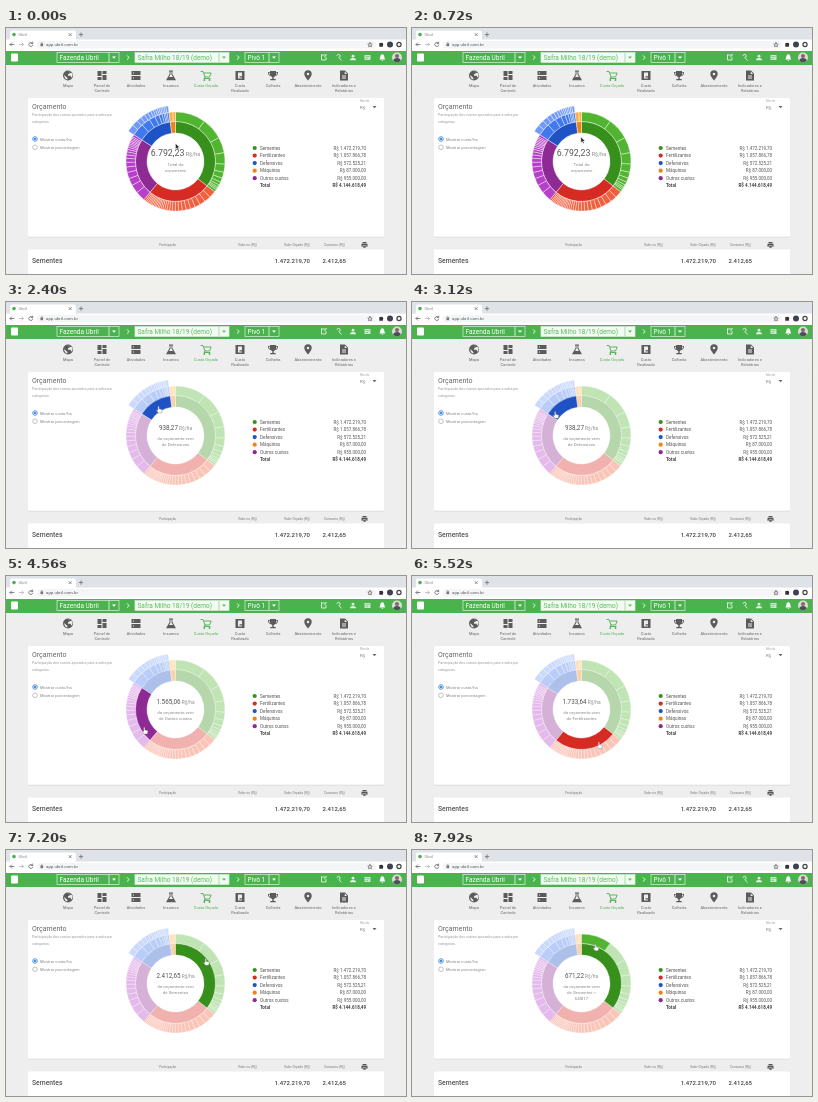
An HTML page that plays this animation: 400 by 246 pixels, repeating every 8000 ms.

```html
<!DOCTYPE html>
<html lang="pt-BR">
<head>
<meta charset="utf-8">
<title>Orçamento</title>
<style>
  html, body { margin: 0; width: 100%; height: 100%; overflow: hidden; background: #eee; }
  svg { display: block; width: 100vw; height: 100vh; }
  text { font-family: Roboto, Arial, sans-serif; white-space: pre; }
  .line { fill: none; stroke-width: .9; stroke-linecap: round; stroke-linejoin: round; }
</style>
</head>
<body>
<svg id="stage" viewBox="0 0 400 246"></svg>
<script>
const stage = document.getElementById('stage');
const CX = 169.5, CY = 133.5, LOOP = 8000, STEP = 240;
const FADED = 0.36;

function add(tag, attrs, parent = stage) {
  const node = document.createElementNS('http://www.w3.org/2000/svg', tag);
  for (const key in attrs) node.setAttribute(key, attrs[key]);
  parent.appendChild(node);
  return node;
}
const rect = (x, y, width, height, fill, extra) => add('rect', { x, y, width, height, fill, ...extra });
const dot = (cx, cy, r, fill, extra) => add('circle', { cx, cy, r, fill, ...extra });
const line = (d, stroke, extra) => add('path', { d, stroke, class: 'line', ...extra });
const shape = (d, fill, extra) => add('path', { d, fill, 'fill-rule': 'evenodd', ...extra });
function text(x, y, content, size, fill = '#555', extra) {
  const node = add('text', { x, y, 'font-size': size, fill, ...extra });
  node.textContent = content;
  return node;
}
const middle = { 'text-anchor': 'middle' }, end = { 'text-anchor': 'end' };
const caret = (x, y, fill) => shape(`M${x - 2} ${y - 1}h4l-2 2.3z`, fill);

function drawBrowser() {
  rect(0, 0, 400, 12, '#dfe2e7');
  rect(4, 2.5, 66, 10, '#fff', { rx: 2 });
  dot(8, 6.6, 1.8, '#4caf50');
  text(12.5, 8.2, 'Ubril', 4.2, '#888');
  line('M63.2 5.6l2 2m0-2l-2 2M73.3 6.6h3.4m-1.7-1.7v3.4', '#777', { 'stroke-width': .6 });
  rect(0, 11.5, 400, 12, '#fff');
  line('M8 16.5h-4m1.6-1.6l-1.6 1.6l1.6 1.6', '#777', { 'stroke-width': .6 });
  line('M13.5 16.5h4m-1.6-1.6l1.6 1.6l-1.6 1.6', '#bbb', { 'stroke-width': .6 });
  line('M26.5 15.4a2 2 0 1 0 .2 1.8M26.7 14v1.6h-1.6', '#777', { 'stroke-width': .6 });
  rect(31, 13, 339, 7.4, '#f4f5f6', { rx: 3.7 });
  rect(34.5, 16, 2.6, 2.2, '#777');
  line('M35 16v-.7q.8-1 1.6 0v.7', '#777', { 'stroke-width': .4 });
  text(40, 18.2, 'app.ubril.com.br', 4.4, '#555');
  line('M364 14.6l.7 1.4 1.5.2-1.1 1 .3 1.5-1.4-.7-1.4.7.3-1.5-1.1-1 1.5-.2z', '#777', { 'stroke-width': .4 });
  shape('M373.3 15h1.2q.6-1.2 1.2 0h1.2v1.2q1.2.5 0 1.2v1.3h-3.6z', '#333');
  dot(384, 16.5, 3, '#3d4450');
  dot(393, 16.5, 2.1, '#fff', { stroke: '#444', 'stroke-width': 1.2 });
}

function selectBox(x, width, label, fill, ink, edge) {
  rect(x, 24.6, width, 9.8, fill, { stroke: '#d9f0d9', 'stroke-width': .7 });
  line(`M${x + width - 10} 25v9`, edge, { 'stroke-width': .6 });
  text(x + 2.5, 31.9, label, 6.5, ink);
  caret(x + width - 5, 29.5, ink);
}

function drawAppBar() {
  rect(0, 23, 400, 14, '#4bb34d');
  rect(5, 25.5, 7, 8, '#fff', { rx: 1 });
  selectBox(51, 62, 'Fazenda Ubril', '#4bb34d', '#fff', '#d9f0d9');
  selectBox(129, 94, 'Safra Milho 18/19 (demo)', '#f3faf3', '#5abb5c', '#a5d9a6');
  selectBox(239, 34, 'Pivô 1', '#4bb34d', '#fff', '#d9f0d9');
  line('M121.3 27.7l1.8 1.8-1.8 1.8M231.3 27.7l1.8 1.8-1.8 1.8', '#fff');
  line('M315.5 27h4m-4 0v5h4.5v-2.5M318.5 29l2-2.5', '#e3f4e3', { 'stroke-width': .7 });
  line('M331 27.5a1.6 1.6 0 1 1 1.8 2l2.5 2.7', '#e3f4e3', { 'stroke-width': .8 });
  dot(347, 28.2, 1.4, '#e3f4e3');
  shape('M344 32.3q0-2.4 3-2.4t3 2.4z', '#e3f4e3');
  shape('M358.5 27h6v5h-6zM359.5 28.5v.6h4v-.6zM359.5 30v.6h2.5v-.6z', '#c8e9c9');
  shape('M373.3 31.5q1-1 1-3 .3-2.3 2-2.3t2 2.3q0 2 1 3zM375.4 32h2l-1 1z', '#fff');
  dot(391, 29.5, 5, '#dcdad8');
  dot(391, 28, 2, '#7d6a62');
  shape('M387.3 32.8q.4-2.8 3.7-2.8t3.7 2.8q-3.7 3.3-7.4 0z', '#4a4f58');
}

function drawMenu() {
  rect(0, 37, 400, 30.5, '#eee');
  const items = [
    [62, 'Mapa', 'M-5 0a5 5 0 1 0 10 0a5 5 0 1 0-10 0zM-3.8-.5l3.2 3v1.5q-3-.5-3.2-4.500zM0-3.800h2v1.500l-2 1v1.500h2.500l1 2q2-3 0-5z'],
    [96, 'Painel de|Controle', 'M-4.500-4.500h4v5h-4zM.5-4.500h4v3h-4zM-4.500 1.500h4v3h-4zM.5-.5h4v5h-4z'],
    [130, 'Atividades', 'M-4.500-4.500h9v4h-9zM-4.500.5h9v4h-9zM-3-3v1h1v-1zM-3 2v1h1v-1z'],
    [165, 'Insumos', 'M-2-5h4v1h-.6v2.500l3.600 6.300h-10l3.600-6.300v-2.500h-.6zM-.5-4v3l-1.500 2.500h4l-1.500-2.500v-3z'],
    [234, 'Custo|Realizado', 'M-4.500-4.500h9v9h-9zM-2-3v6h4v-1h-2.500v-1.200h2.500v-3.800z'],
    [267, 'Colheita', 'M-3-4.500h6v1h2q0 4-3 4-.5 1-1.300 1.300v1.700h2v1.200h-5.400v-1.200h2v-1.700q-.8-.3-1.300-1.300-3 0-3-4h2zM-4-2.700q0 1.700 1 2.200v-2.200zM4-2.700h-1v2.200q1-.5 1-2.200z'],
    [302, 'Abastecimento', 'M0 5q-3.700-4.300-3.700-6.500a3.700 3.700 0 0 1 7.400 0q0 2.200-3.700 6.500zM-1.300-1.500a1.300 1.300 0 1 0 2.600 0a1.300 1.300 0 1 0-2.600 0z'],
    [338, 'Indicadores e|Relatórios', 'M-4-5h5l3 3v7h-8zM-2 0v.9h4v-.9zM-2 2v.9h4v-.9zM.7-4v2.500h2.500z']
  ];
  const label = (x, lines, color) =>
    lines.split('|').forEach((part, i) => text(x, 59.4 + i * 4.7, part, 4, color, middle));
  for (const [x, lines, d] of items) {
    shape(d, '#5b5b5b', { transform: `translate(${x} 47.500)` });
    label(x, lines, '#666');
  }
  line('M195 43.500h2l2 5.500h4.500l1.700-4h-7M199 49l-1 1.500h6', '#4caf50');
  dot(198.3, 52, .9, '#4caf50');
  dot(203.500, 52, .9, '#4caf50');
  label(200, 'Custo Orçado', '#4caf50');
}

const groups = [
  { name: 'Sementes', share: 35.5, perHa: '2.412,65', total: '1.472.219,70', colors: ['#37901b', '#52b532'], rate: .278 },
  { name: 'Fertilizantes', share: 25.5, perHa: '1.733,64', total: '1.057.866,78', colors: ['#d62b23', '#f0603e'], rate: .09 },
  { name: 'Outros custos', share: 23.1, perHa: '1.565,06', total: '955.000,00', colors: ['#8d2a93', '#b740c8'], rate: .14 },
  { name: 'Defensivos', share: 13.8, perHa: '938,27', total: '572.525,21', colors: ['#1f53c5', '#4078ed', '#7099fb'], rate: .3 },
  { name: 'Máquinas', share: 2.1, perHa: '114,72', total: '87.000,00', colors: ['#ee8417', '#ffad42'], rate: .6 }
];

function drawPage() {
  rect(22, 70.5, 356, 139, '#d9d9d9', { rx: 1 });
  rect(22, 70, 356, 138.8, '#fff', { rx: 1 });
  text(26, 81.2, 'Orçamento', 7, '#666');
  text(26, 87.5, 'Participação dos custos apurados para a safra por', 3.6, '#999');
  text(26, 94.6, 'categorias.', 3.6, '#999');
  dot(29, 111, 2.3, '#fff', { stroke: '#4a8de8', 'stroke-width': .9 });
  dot(29, 111, 1.3, '#4a8de8');
  text(34, 112.6, 'Mostrar custo/ha', 4.1, '#888');
  dot(29, 119.3, 2.3, '#fff', { stroke: '#aaa', 'stroke-width': .7 });
  text(34, 120.9, 'Mostrar porcentagem', 4.1, '#888');
  text(354, 74.2, 'Moeda', 3, '#aaa');
  text(354, 81, 'R$', 4.4, '#777');
  caret(368.5, 79, '#666');

  [0, 1, 3, 4, 2].forEach((index, row) => {
    const { name, total, colors } = groups[index], y = 121.5 + row * 7.55;
    dot(248.7, y - 1.5, 2.1, colors[0]);
    text(254, y, name, 4.6, '#555');
    text(360, y, 'R$ ' + total, 4.5, '#555', end);
  });
  text(254, 159.2, 'Total', 4.5, '#444', { 'font-weight': 700 });
  text(360, 159.2, 'R$ 4.144.618,49', 4.5, '#444', { 'font-weight': 700, ...end });

  rect(22, 221.5, 356, 25, '#fff');
  text(170, 217.8, 'Participação', 3, '#777', end);
  text(251, 217.8, 'Valor no (R$)', 3.3, '#777', end);
  text(304, 217.8, 'Valor Orçado (R$)', 3.3, '#777', end);
  text(339, 217.8, 'Consumo (R$)', 3.3, '#777', end);
  shape('M356.5 214h4v1.3h-4zM355.5 215.8h6v3h-1.2v-1.4h-3.600v1.4h-1.2zM357.3 218h2.4v1.7h-2.4z', '#555');
  text(26, 235.3, 'Sementes', 6.8, '#555', { 'font-weight': 500 });
  text(304, 234.6, '1.472.219,70', 6, '#444', { 'font-weight': 500, ...end });
  text(340, 234.6, '2.412,65', 6, '#444', { 'font-weight': 500, ...end });
}

// Angles are in degrees, clockwise from twelve o'clock.
function polar(angle, r) {
  const a = angle * Math.PI / 180;
  return [CX + r * Math.sin(a), CY - r * Math.cos(a)];
}
function slice(from, to, inner, outer, fill) {
  const large = to - from > 180 ? 1 : 0;
  return add('path', {
    d: `M${polar(from, outer)}A${outer} ${outer} 0 ${large} 1 ${polar(to, outer)}` +
       `L${polar(to, inner)}A${inner} ${inner} 0 ${large} 0 ${polar(from, inner)}Z`,
    fill, stroke: '#fff', 'stroke-width': .4
  });
}
function subdivide(from, to, rate, inner, outer, fill) {
  const parts = [];
  let start = from;
  while (start < to) {
    let stop = start + Math.max((to - start) * rate, 1.8);
    if (to - stop < 1.5) stop = to;
    parts.push(slice(start, stop, inner, outer, fill));
    start = stop;
  }
  return parts;
}

const RADII = [28.5, 40, 49.5, 56];
function drawChart() {
  let start = 0;
  for (const group of groups) {
    group.from = start;
    group.to = start += group.share * 3.6;
    group.core = slice(group.from, group.to, RADII[0], RADII[1], group.colors[0]);
    group.outer = group.colors.slice(1).flatMap((color, i) =>
      subdivide(group.from, group.to, group.rate / (i + 1), RADII[i + 1], RADII[i + 2], color));
  }
}

drawBrowser();
drawAppBar();
drawMenu();
drawPage();
drawChart();

const value = text(CX, 128.3, '', 6.3, '#555', middle);
const amount = add('tspan', {}, value);
const unit = add('tspan', { fill: '#888' }, value);
const caption = [0, 1, 2].map(i => text(CX, 138.4 + i * 5.6, '', 4.4, '#888', middle));
const arrow = shape('M0 0v5.6l1.4-1.2 1 2 .9-.4-.9-2h1.8z', '#222', { stroke: '#fff', 'stroke-width': .4 });
const hand = shape('M-.6 0q.6-.6 1.200 0v2.400l2.600.7q.6.300.4 1l-.6 2.400h-3.200l-2-2.600q.4-.8 1.600 0z', '#fff',
  { stroke: '#666', 'stroke-width': .4 });

// Pointer path around the ring: time, angle, radius.
const path = [
  [0, 0, 18], [1440, -3, 31], [3120, -48, 35.4], [4560, -120, 36],
  [5520, -208, 37], [6240, -261, 35], [7920, -340.7, 41.5], [8000, -340.7, 41.5]
];
function pointerAt(time) {
  const i = path.findIndex((key, k) => k > 0 && time <= key[0]);
  const [a, b] = [path[i - 1], path[i]];
  const p = (time - a[0]) / (b[0] - a[0]), eased = p * p * (3 - 2 * p);
  return [1, 2].map(k => a[k] + (b[k] - a[k]) * eased);
}

function render(time) {
  const [angle, radius] = pointerAt(time);
  const turn = (angle % 360 + 360) % 360;
  const active = radius > RADII[0] ? groups.find(g => turn >= g.from && turn < g.to) : null;
  const sub = active && radius > RADII[1] ? active.outer[0] : null;
  for (const group of groups) {
    group.core.setAttribute('opacity', !active || group === active ? 1 : FADED);
    for (const part of group.outer) part.setAttribute('opacity', !active || part === sub ? 1 : FADED);
  }
  value.setAttribute('font-size', active ? 6.3 : 8.8);
  amount.textContent = sub ? '671,22' : active ? active.perHa : '6.792,23';
  unit.textContent = ' R$/ha';
  unit.setAttribute('font-size', active ? 4.8 : 5.4);
  const lines = sub ? ['do orçamento vem', 'de Sementes >', '64I017']
    : active ? ['do orçamento vem', 'de ' + active.name] : ['Total do', 'orçamento'];
  caption.forEach((node, i) => node.textContent = lines[i] || '');
  for (const [pointer, shown] of [[arrow, !active], [hand, active]]) {
    pointer.setAttribute('transform', `translate(${polar(angle, radius)})`);
    pointer.setAttribute('visibility', shown ? 'visible' : 'hidden');
  }
}

function tick(now) {
  render(Math.floor(now % LOOP / STEP) * STEP);
  requestAnimationFrame(tick);
}
tick(performance.now());
</script>
</body>
</html>
```
